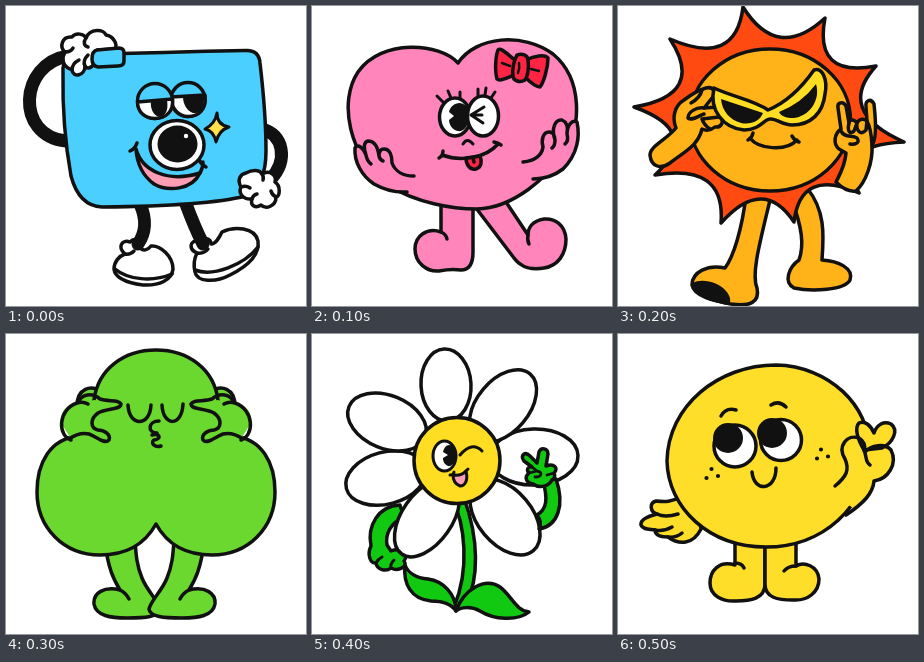
Write an HTML page that moves like this. It is 300 px wide and 300 px high and loops after 600 ms.

```html
<!DOCTYPE html>
<html lang="en">
<head>
<meta charset="utf-8">
<title>Characters</title>
<style>
html, body { margin: 0; width: 100%; height: 100%; overflow: hidden; background: #fff; }
svg { display: block; width: 100vw; height: 100vh; }
.scene { opacity: 0; stroke: #111; stroke-width: 3.5; stroke-linecap: round; stroke-linejoin: round; }
.line { fill: none; }
.ink { fill: #111; stroke: none; }
.white { fill: #fff; }
.limb { fill: none; stroke-width: 13; }
</style>
</head>
<body>
<svg viewBox="0 0 300 300">

<!-- camera -->
<g class="scene" fill="#4bcfff">
  <g class="white">
    <path d="M119 248C111 241 116 233 124 236C129 231 134 235 133 241C137 246 142 244 145 240C154 239 167 250 167 263C166 274 153 280 137 279C122 277 109 272 108 263C108 256 113 250 119 248Z"/>
    <path class="line" d="M109 263C122 274 147 276 166 268M119 248Q124 249 128 245"/>
    <path d="M191 247C182 243 184 234 192 235C198 230 205 233 205 238C210 238 213 232 216 226C228 220 249 221 252 235C254 250 240 261 224 269C209 277 191 276 189 266C187 258 189 251 191 247Z"/>
    <path class="line" d="M189 264C207 271 238 259 252 241M191 247Q198 248 202 243"/>
  </g>
  <path class="limb" d="M62 50C13 58 9 130 60 135M256 123C277 128 283 154 264 174M134 198C141 214 140 226 132 238M180 198Q188 220 197 238"/>
  <path d="M57 66Q56 50 72 49Q160 46 240 44.500Q253 44 254 57Q260 108 260 145Q260 180 240 190Q200 200 96 201Q73 200 65 170Q56 120 57 66Z"/>
  <path class="white" d="M62 62C56 58 56 51 59 46C53 41 56 30 66 31C70 26 78 28 80 32C84 22 98 23 100 29C107 30 112 38 109 43L92 44C86 46 86 52 88 58C84 64 80 62 79 60C79 70 67 72 66 64Z"/>
  <path class="line" d="M66 64C66 59 69 56 73 54M79 60C77 56 79 52 82 49M80 32C77 36 78 40 82 41M59 46Q65 46 67 42"/>
  <path d="M91 44L113 42Q118 42 118 47L118 55Q118 60 112 60L92 61Q86 60 86 53Q86 45 91 44Z"/>
  <path class="white" d="M240 167C247 163 254 164 256 168C264 163 271 170 269 176C275 180 274 190 270 191C270 200 260 204 255 199C249 203 244 199 246 193C237 194 232 187 235 181C231 174 234 168 240 167Z"/>
  <path class="line" d="M235 181Q240 179 244 182M246 193Q247 189 251 188M270 191Q266 189 265 185M256 168Q258 171 257 174"/>
  <circle cx="182" cy="93.500" r="17"/>
  <path class="white" d="M165 91L199 89C201 104 192 110.500 182 110.500C173 110.500 165 103 165 91Z"/>
  <path class="ink" d="M177 91L198 89C199 104 192 108 187 107C181 105 177 98 177 91Z"/>
  <circle cx="149" cy="95" r="17.500"/>
  <path class="white" d="M131.500 96L166.500 93C168 106 159 112.500 149 112.500C139 112.500 131.500 106 131.500 96Z"/>
  <path class="ink" d="M145 95L161 94C163 106 158 111 153 111C147 109 144 102 145 95Z"/>
  <ellipse class="white" cx="171" cy="139" rx="27" ry="24.500"/>
  <ellipse class="ink" cx="171.500" cy="138" rx="20" ry="18.500"/>
  <circle cx="180" cy="130" r="2.200" fill="#fff" stroke="none"/>
  <path fill="#ff9db5" d="M130 143C136 165 162 177 194 167C186 184 162 186 148 178C137 170 131 158 130 143Z"/>
  <path class="line" d="M124 145Q129 143 131 137M194 167Q197 162 197 156M193 154Q196 159 200 161"/>
  <path fill="#ffe14d" stroke-width="3" d="M211 107Q211 119 223 121Q213 124 210 136Q208 125 199 123Q209 118 211 107Z"/>
</g>

<!-- heart -->
<g class="scene" fill="#ff85bb">
  <path d="M129 194V226C115 221 103 230 103 243C103 257 115 266 127 265C137 263 142 263 149 264C158 264 161 256 161 246V194Z"/>
  <path class="line" d="M129 226Q134 228 135 233"/>
  <path d="M161 198L202 252C209 262 221 264 232 262C246 260 254 248 254 233C253 219 243 212 232 213C220 215 216 222 216 229L190 190Z"/>
  <path class="line" d="M216 229Q215 234 217 238"/>
  <path d="M146 57C128 37 70 32 46 66C26 96 37 150 75 179C105 197 140 203 165 203C203 202 235 170 251 149C270 121 271 73 241 48C211 26 164 30 146 57Z"/>
  <path stroke="none" d="M46 137C40 148 46 166 62 178Q78 187 95 186L102 170L78 140Z"/>
  <path class="line" d="M102 170C91 170 83 165 80 157C80 150 78 143 72 143C68 143 67 147 67 150C66 142 63 135 56 135C51 136 52 144 54 149C52 142 45 137 43 142C42 156 50 170 62 178Q78 187 95 186M54 149Q55 155 59 158M67 150Q68 154 71 155"/>
  <path stroke="none" d="M232 130L240 118L253 113L266 115L267 130Q264 151 251 163Q238 173 221 173L211 156Z"/>
  <path class="line" d="M211 156C223 155 230 149 231 141C229 134 231 126 237 126C241 126 243 130 243 134C239 123 243 113 250 114C255 116 256 122 255 128C255 120 260 113 265 116C268 130 266 148 251 163Q238 173 221 173M243 134Q243 140 240 142M255 128Q257 135 253 138"/>
  <g fill="#ff2344">
    <path d="M203 54C196 49 189 41 186 44C183 52 183 66 185 73C188 76 197 71 202 69Z"/>
    <path d="M214 54C222 50 233 48 236 52C236 61 232 76 228 81C223 81 217 75 213 71Z"/>
    <path d="M205 49C210 47 216 49 216 54C217 61 216 70 213 74C208 77 201 75 201 70C200 63 202 54 205 49Z"/>
    <path class="line" stroke-width="2.500" d="M190 57L198 60M219 63L227 65M207 57Q208 62 206 67"/>
  </g>
  <g class="white">
    <ellipse cx="143" cy="111" rx="15.500" ry="19"/>
    <ellipse cx="171" cy="110" rx="15.500" ry="20"/>
  </g>
  <path class="ink" d="M148 97C156 98 158 106 157 112C156 121 151 126 146 125C140 124 137 118 137 114L142 110L137 106C138 101 142 97 148 97Z"/>
  <path class="line" stroke-width="3" d="M172 101L159 109L171 117M159 109H170M125 90L131 96M136 85L139 92M148 86V92M166 83V90M174 82L173 89M183 86L179 92"/>
  <path class="line" stroke-width="3" d="M151 138Q155 131 161 138"/>
  <path fill="#ff2344" d="M154 152C154 159 158 164 164 163C170 161 170 155 168 150Z"/>
  <path class="line" d="M130 149C149 156 174 152 186 138M127 152Q131 150 131 145M182 136Q186 137 189 139M161 152L162 156"/>
</g>

<!-- sun -->
<g class="scene" fill="#ffb319">
  <path d="M128 190C124 222 116 250 107 262C90 258 74 266 74 279C76 291 98 295 113 298C132 301 142 296 139 282C133 268 142 236 153 190Z"/>
  <path class="ink" d="M75 277C83 272 101 276 108 285C114 292 113 298 109 299C95 296 75 291 75 277Z"/>
  <path d="M172 190C185 222 186 240 181 254C171 261 165 276 176 282C194 286 227 284 232 274C236 262 220 255 204 254C206 228 207 204 189 182Z"/>
  <path id="rays" fill="#ff4a12"/>
  <ellipse cx="152" cy="114" rx="80.500" ry="71"/>
  <path d="M58 122C54 112 56 100 66 94C74 88 80 84 88 82C96 80 99 88 94 92L86 102L100 101C107 102 107 109 101 111C107 114 104 122 97 121C92 125 88 125 84 123C80 140 66 146 52 157C42 164 33 160 32 149C32 140 48 134 58 122Z"/>
  <path class="line" d="M86 102C78 101 70 106 70 112C74 115 80 110 86 108M101 111L84 113Q86 119 92 123M84 84Q82 92 73 97"/>
  <path d="M228 147C227 160 222 168 218 176C224 182 231 186 238 185C248 176 255 156 254 139C260 132 257 108 256 98C253 92 247 94 248 101L249 115C245 112 241 113 239 117C236 113 231 113 231 117L228 100C225 95 219 96 220 102L223 123C216 128 215 138 221 143Z"/>
  <path class="line" d="M231 117C229 125 232 129 236 125L239 117M239 117C238 125 243 130 248 124L249 115M223 125C226 132 234 129 239 132C243 137 236 139 232 138M249 115Q253 122 254 139"/>
  <path fill="#ffdd22" d="M96 82C115 91 136 94 150 104C167 97 182 84 196 64C204 61 210 73 207 88C205 107 193 119 174 119C164 119 158 112 152 113C146 113 142 124 126 124C105 122 91 104 96 82Z"/>
  <path class="ink" d="M103 93Q124 100 145 107C142 115 133 119 123 117C112 114 104 105 103 93ZM161 106Q184 97 198 78C203 94 191 111 175 112C168 112 163 110 161 106Z"/>
  <path class="line" d="M132 132C140 143 168 146 179 134M130 134Q134 132 135 127M174 130Q177 135 181 136"/>
</g>

<!-- green -->
<g class="scene" fill="#6bd82f">
  <g id="leg">
    <path d="M99 208C102 235 108 246 114 256C98 252 87 259 88 270C90 282 105 284 121 284C139 284 153 283 154 275C152 266 141 257 136 244C131 232 130 222 129 206Z"/>
    <path class="line" d="M114 256Q120 259 123 265"/>
  </g>
  <use href="#leg" transform="matrix(-1 0 0 1 297 0)"/>
  <g id="ear">
    <path d="M71 72C71 55 85 49 96 59L100 72Z"/>
  </g>
  <use href="#ear" transform="matrix(-1 0 0 1 300 0)"/>
  <path d="M88 66C92 35 118 16 150 16C182 16 208 35 212 66L218 110H82Z"/>
  <path stroke="none" d="M76 72L224 72L232 104L150 190L68 104Z"/>
  <path stroke="none" d="M72 102C44 105 31 129 31 158C31 194 58 221 94 221C121 221 139 210 150 190C161 210 179 221 206 221C242 221 269 194 269 158C269 129 256 105 228 102Z"/>
  <path class="line" d="M72 102C44 105 31 129 31 158C31 194 58 221 94 221C121 221 139 210 150 190C161 210 179 221 206 221C242 221 269 194 269 158C269 129 256 105 228 102"/>
  <g id="hand">
    <path stroke="none" d="M57 92C51 81 60 68 74 70L88 66L114 69L89 80L87 95L103 108L65 105Z"/>
    <path class="line" d="M65 106C52 102 51 76 71 69C76 60 86 58 94 65C102 68 113 65 115 70C115 76 100 74 92 79C84 85 84 94 92 96C99 96 105 101 103 106C99 111 91 103 83 100Q73 98 63 105M71 69Q77 67 82 70"/>
  </g>
  <use href="#hand" transform="matrix(-1 0 0 1 300 0)"/>
  <path class="line" d="M122 71C123 93 144 93 145 71M156 71C157 93 176 93 177 70M153 87C142 87 141 99 151 99M146 101C154 99 156 105 148 106C144 109 149 114 155 112"/>
</g>

<!-- daisy -->
<g class="scene" fill="#12c912">
  <path d="M140 164C153 190 158 235 142 273L154 270C167 245 167 205 152 164Z"/>
  <path d="M93 231C91 250 99 265 119 267C132 267 140 271 144 277C144 260 131 247 116 245C105 244 96 239 93 231Z"/>
  <path d="M144 277C152 255 173 243 188 253C199 261 204 277 217 278C206 287 182 286 168 277C159 272 149 273 144 277Z"/>
  <path d="M88 171C66 172 55 192 59 212C55 220 58 230 64 229C65 236 74 238 79 234C87 238 96 232 92 227C97 221 89 213 79 217L75 211C73 200 79 188 92 184Z"/>
  <path class="line" stroke-width="3" d="M64 229Q66 225 70 223M79 234Q78 230 82 226"/>
  <g id="petals" class="white"></g>
  <path d="M231 147C236 165 235 175 225 181C229 186 229 191 227 195C246 192 253 171 244 145Z"/>
  <path d="M221 150C214 149 212 143 217 139C214 136 216 132 220 133L212 127C208 121 213 117 218 122L225 129L227 118C229 113 236 114 236 120L234 132C242 129 247 134 242 139C243 141 243 145 240 146C237 152 228 155 221 150Z"/>
  <path class="line" stroke-width="2.800" d="M217 139L225 137C231 138 230 143 223 143M220 133L225 137M242 139L235 141"/>
  <circle cx="145" cy="126.500" r="43" fill="#ffdd22"/>
  <ellipse class="white" cx="132.500" cy="122" rx="11.500" ry="15" stroke-width="3"/>
  <path class="ink" d="M137 111C143 111 144 117 144 122C143 129 139 133 136 132C132 130 131 127 131 124L136 121L131 118C132 114 134 111 137 111Z"/>
  <path class="line" stroke-width="3" d="M148 121Q160 107 170 117"/>
  <path fill="#ff9db5" stroke-width="3" d="M141 141Q150 142 154 137C156 145 154 152 148 152C143 150 141 146 141 141Z"/>
  <path class="line" stroke-width="3" d="M138 141Q142 141 142 138M154 137L156 135"/>
</g>

<!-- yellow -->
<g class="scene" fill="#ffde2a">
  <path d="M117 202V231C101 226 92 237 92 249C92 262 105 268 118 267C132 267 147 265 147 250V202Z"/>
  <path d="M147 202V250C147 264 160 266 175 266C190 267 201 258 201 245C200 232 186 227 178 232V202Z"/>
  <path class="line" d="M117 229Q124 229 126 234M166 237Q170 232 178 232"/>
  <path d="M62 163C54 168 47 168 38 167C31 169 32 178 39 180C31 182 22 185 23 191C25 196 32 195 37 196C37 202 43 203 50 203C61 211 75 211 83 195L77 160Z"/>
  <path class="line" d="M39 180Q47 184 60 180M37 196Q45 198 54 193M50 203Q58 204 64 199"/>
  <path d="M158 31C211 32 252 72 251 116C250 174 204 213 148 213C91 213 50 174 49 127C50 72 100 31 158 31Z"/>
  <path stroke="none" d="M224 112L236 102L246 104L260 110L275 118L276 130C270 145 256 147 254 151C251 162 242 169 235 174L212 158Z"/>
  <path d="M246 116C240 106 236 94 241 89C247 86 253 92 256 99C259 90 266 87 273 90C281 96 275 109 264 114Z"/>
  <path class="line" d="M217 152C228 143 232 136 227 125C219 112 229 100 241 104C246 107 248 112 246 116M246 116C249 123 247 128 252 131M247 118C253 111 267 109 273 116C280 130 270 145 256 147C255 159 246 169 228 181"/>
  <g class="white">
    <circle cx="117" cy="112" r="21"/>
    <circle cx="163" cy="106" r="20.500"/>
  </g>
  <circle class="ink" cx="110" cy="104" r="15"/>
  <circle class="ink" cx="154" cy="99" r="15"/>
  <path class="line" d="M103 82Q108 73 118 76M153 71Q161 66 168 73M134 138C136 159 158 157 158 134"/>
  <path class="line" stroke-width="4.200" d="M93.500 135h.01M88.500 144h.01M100 142h.01M203 115.500h.01M199 124.500h.01M210 122.500h.01"/>
</g>
</svg>

<script>
const STEP = 100;

// Sun rays: pointed tips joined by arcs that bend toward the middle
const tips = [[125, 1], [207, 12], [258, 60], [286, 136], [241, 187],
              [176, 216], [103, 217], [37, 169], [16, 101], [52, 33]];
const mid = [152, 114], bend = 0.46;
document.getElementById('rays').setAttribute('d', 'M' + tips[0] + tips.map((a, i) => {
  const b = tips[(i + 1) % tips.length];
  const ctrl = a.map((v, k) => {
    const m = (v + b[k]) / 2;
    return m + (mid[k] - m) * bend;
  });
  return 'Q' + ctrl + ' ' + b;
}).join('') + 'Z');

// Petals: x, y, half length, half width, angle
const petals = [[193, 183, 44, 27, 50], [115, 184, 44, 25, 125], [74, 144, 41, 26, 165],
                [222, 123, 44, 28, -2], [191, 72, 42, 26, -50], [75, 88, 41, 26.5, 22],
                [134, 51, 36, 25, 87]];
document.getElementById('petals').innerHTML = petals.map(([x, y, rx, ry, a]) =>
  `<ellipse rx="${rx}" ry="${ry}" transform="translate(${x} ${y}) rotate(${a})"/>`).join('');

// Each scene shows for one step, then cuts to the next
const scenes = [...document.querySelectorAll('.scene')];
const n = scenes.length;
scenes.forEach((scene, i) => scene.animate([
  { opacity: 1, offset: 0, easing: 'step-end' },
  { opacity: 0, offset: 1 / n, easing: 'step-end' },
  { opacity: 0, offset: 1 }
], { duration: n * STEP, delay: (i - n) * STEP, iterations: Infinity }));
</script>
</body>
</html>
```
